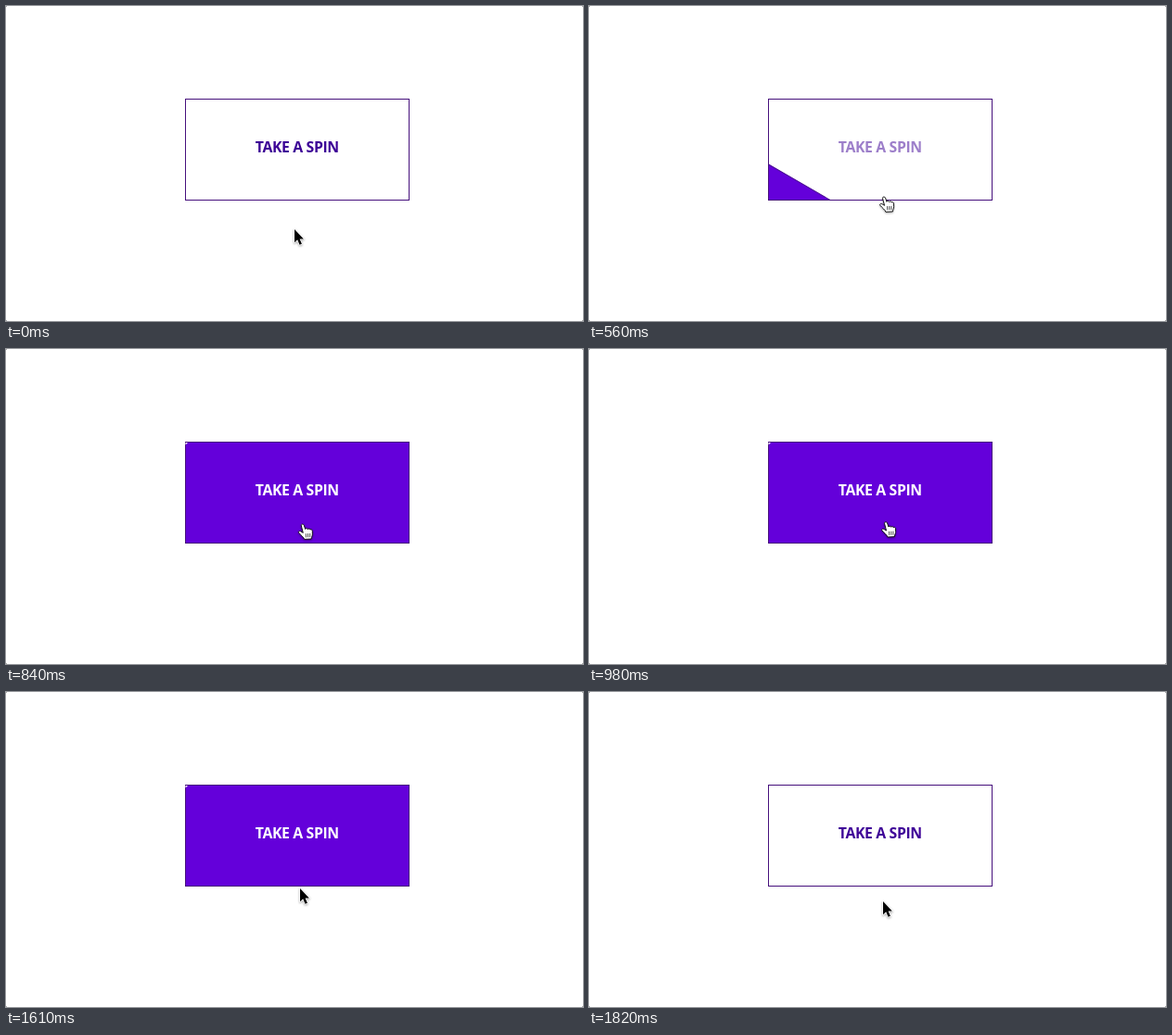
An HTML page for the animation above (1.89 s loop, 622x340 px).

```html
<!DOCTYPE html>
<html lang="en">
<head>
<meta charset="utf-8">
<title>Take a spin</title>
<style>
  html, body { margin: 0; width: 100%; height: 100%; overflow: hidden; background: #fff; }
  svg { display: block; }
  text { font: 700 15.8px "Open Sans", sans-serif; letter-spacing: -.36px; text-anchor: middle; }
  .cursor { filter: drop-shadow(0 1px 1px rgba(0, 0, 0, .35)); }
</style>
</head>
<body>
<svg width="622" height="340" viewBox="0 0 622 340">
  <defs>
    <clipPath id="inside"><rect x="193" y="100" width="242" height="110"/></clipPath>
  </defs>
  <rect width="622" height="340" fill="#fff"/>
  <path d="M0 0h1l-1 1zM622 0v1l-1-1zM0 340v-1l1 1zM622 340h-1l1-1z" fill="#555"/>
  <g clip-path="url(#inside)">
    <rect id="fill" x="-500" width="1200" height="700" fill="#6400da" stroke="#4a0a96"/>
  </g>
  <rect x="193.5" y="100.5" width="241" height="109" fill="none" stroke="#46107c"/>
  <path id="nick" d="M193.5 101h2.5l-2.5 2.5z" fill="#fff"/>
  <text id="label" x="313.8" y="158.2">TAKE A SPIN</text>
  <g id="arrow" class="cursor">
    <path d="M0 0V14.2L3.2 11.2L5.5 16.7L7.9 15.7L5.6 10.4H9.9Z"
          fill="#000" stroke="#fff" stroke-width="1.6" paint-order="stroke" stroke-linejoin="round"/>
  </g>
  <g id="hand" class="cursor" stroke="#000" stroke-linecap="round" stroke-linejoin="round">
    <path d="M-1.5 1C-1.8-.6 1-.8 1.5.8L2.9 5C3.4 3.8 5.2 4 5.5 5.2C6.2 4.2 7.8 4.4 8.2 5.7C9 4.9 10.3 5.4 10.5 6.8
             L10.6 10.5C10.5 12.5 9.6 13 9.4 15.6L1.9 16C1.5 14-2 11.5-4.2 8.8C-5 7.4-3.2 6.6-1.8 7.6L.2 8.8Z"
          fill="#fff" stroke-width=".9"/>
    <path d="M3.5 10.2l.2 3.3M5.7 10.1l.1 3.3M7.9 10v3.3" fill="none" stroke-width=".7"/>
  </g>
</svg>
<script>
const LOOP = 1890, STEP = 70;
const ENTER = 487, LEAVE = 1610, FADE = 250;

// Pointer stops: time, x, y
const stops = [
  [0, 311, 241], [70, 311, 246.5], [280, 312, 226], [560, 318, 206.3],
  [880, 320, 187], [1320, 320, 187], [1610, 317, 212], [1820, 317, 226]
];

const $ = id => document.getElementById(id);
const [fill, nick, label, arrow, hand] = ["fill", "nick", "label", "arrow", "hand"].map($);

const lerp = (a, b, k) => a + (b - a) * k;
const mix = (a, b, k) => `rgb(${a.map((v, i) => Math.round(lerp(v, b[i], k)))})`;
const show = (el, on) => el.setAttribute("visibility", on ? "visible" : "hidden");

// CSS "ease": cubic-bezier(.25, .1, .25, 1)
function ease(x) {
  if (x <= 0) return 0;
  if (x >= 1) return 1;
  const bez = (a, b, s) => 3 * a * s * (1 - s) ** 2 + 3 * b * s * s * (1 - s) + s ** 3;
  let lo = 0, hi = 1;
  for (let i = 0; i < 24; i++) {
    const mid = (lo + hi) / 2;
    if (bez(.25, .25, mid) < x) lo = mid; else hi = mid;
  }
  return bez(.1, 1, lo);
}

function pointer(t) {
  const i = stops.findLastIndex(s => s[0] <= t);
  const [t0, x0, y0] = stops[i];
  const [t1, x1, y1] = stops[(i + 1) % stops.length];
  const k = (t - t0) / ((t1 || LOOP) - t0);
  return [lerp(x0, x1, k), lerp(y0, y1, k)];
}

function draw(t) {
  const p = ease((t - ENTER) / FADE) - ease((t - LEAVE) / FADE);
  const over = t >= ENTER && t < LEAVE;

  // The panel swings down to level while rising from the lower left corner
  fill.setAttribute("transform", `translate(193 210) rotate(${lerp(60, 0, p)})`);
  fill.setAttribute("y", -lerp(-41, 110, p));
  label.setAttribute("fill", mix([60, 0, 150], [255, 255, 255], p));
  show(nick, p > .95);

  const at = `translate(${pointer(t)})`;
  arrow.setAttribute("transform", at);
  hand.setAttribute("transform", at);
  show(arrow, !over);
  show(hand, over);
}

const start = performance.now();
function tick() {
  const t = (performance.now() - start) % LOOP;
  draw(Math.floor(t / STEP) * STEP);
  requestAnimationFrame(tick);
}
tick();
</script>
</body>
</html>
```
